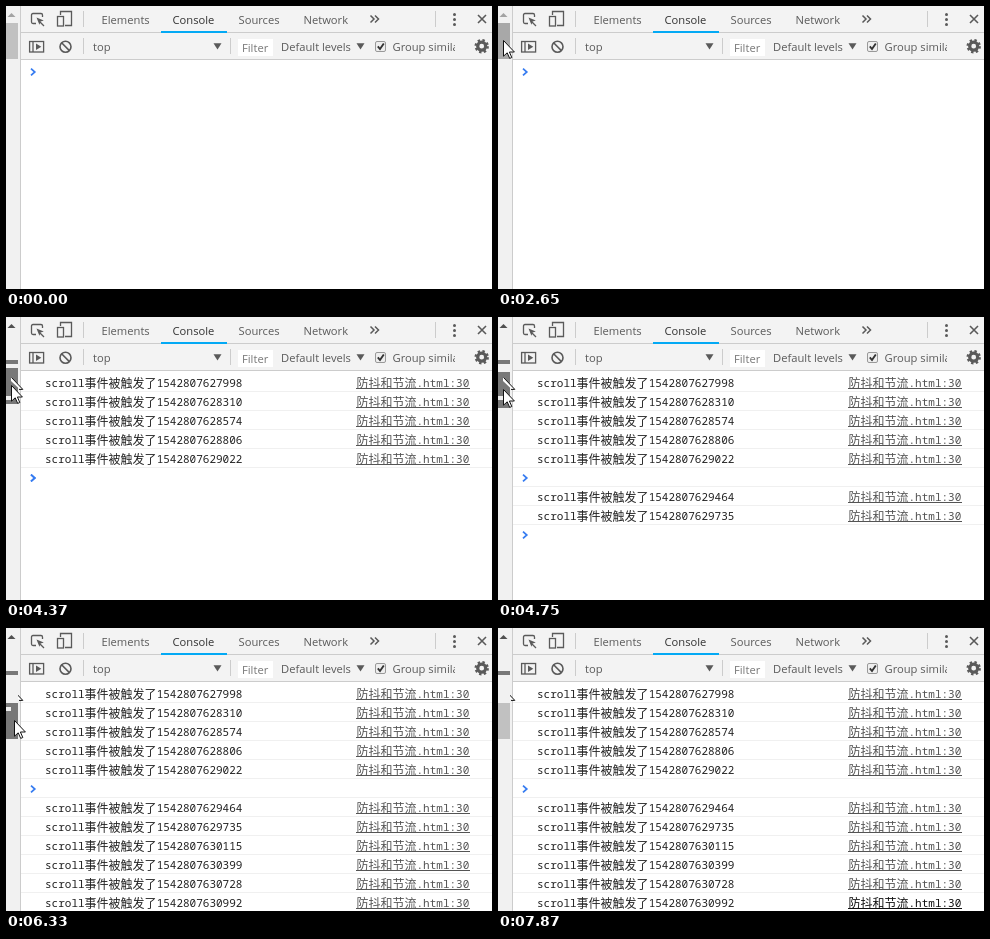
Write an HTML page that moves like this. It is 486x283 px and loops after 7.95 s.

```html
<!DOCTYPE html>
<html lang="zh">
<head>
<meta charset="utf-8">
<title>Scroll event log</title>
<style>
  html, body { margin: 0; width: 100%; height: 100%; overflow: hidden; background: #fff; }
  svg { display: block; width: 486px; height: 283px; }
  .ui { font: 11.2px "Open Sans", "Noto Sans", sans-serif; fill: #5a5a5a; }
  .mono { font: 11px "Noto Sans Mono", "DejaVu Sans Mono", monospace; fill: #222; white-space: pre; }
  .cjk { font: 12px "Noto Sans CJK SC", "Noto Sans CJK", sans-serif; baseline-shift: -1px; }
  .link { fill: #545454; }
  .link.hot { fill: #111; }
  .link .mono { fill: inherit; }
  .icon { fill: none; stroke: #5a5a5a; stroke-width: 1.3; }
  .solid { fill: #5a5a5a; }
  .line { fill: #ccc; }
  .prompt { fill: none; stroke: #367cf1; stroke-width: 1.7; }
</style>
</head>
<body>
<svg viewBox="0 0 486 283">
  <defs>
    <path id="arrow" d="M.5 .5V16.2L4.2 12.8L6.7 18.4L8.8 17.5L6.4 12H11.4Z" fill="#fff" stroke="#111" stroke-linejoin="round"/>
    <clipPath id="labelClip"><rect x="380" y="28" width="69" height="24"/></clipPath>
    <clipPath id="trailClip"><rect id="trailBox" y="60" width="18" height="13"/></clipPath>
  </defs>
  <rect width="486" height="283" fill="#fff"/>

  <rect x="15" width="471" height="53" fill="#f3f3f3"/>
  <rect class="line" x="15" y="26" width="471" height="1"/>
  <rect class="line" x="15" y="53" width="471" height="1"/>
  <rect x="155" y="25" width="66" height="2" fill="#03a9f4"/>

  <g class="line">
    <rect x="77" y="5" width="1" height="16"/>
    <rect x="429" y="5" width="1" height="16"/>
    <rect x="77" y="32" width="1" height="16"/>
    <rect x="224" y="32" width="1" height="16"/>
  </g>

  <g class="icon">
    <path d="M30 17.5H27Q25.5 17.5 25.5 16V9Q25.5 7.5 27 7.5H35Q36.5 7.5 36.5 9V11"/>
    <path d="M34 16L38 20"/>
    <path d="M54.5 9V5.5H65.5V19.5H59"/>
    <rect x="51.5" y="10.5" width="6" height="9.5"/>
    <path d="M364.5 9.5L368 13L364.5 16.5M369 9.5L372.5 13L369 16.5" stroke-width="1.5"/>
    <path d="M472 9L480 17M480 9L472 17" stroke-width="1.6"/>
    <rect x="23.6" y="35.5" width="14" height="10.5"/>
    <path d="M27 35.5V46"/>
    <circle cx="59.5" cy="40.7" r="5.5" stroke-width="1.6"/>
    <path d="M55.6 36.8L63.4 44.6" stroke-width="1.6"/>
    <circle cx="475.7" cy="40.2" r="4" stroke-width="3.2"/>
    <circle cx="475.7" cy="40.2" r="6" stroke-width="2.4" stroke-dasharray="2.356"/>
  </g>
  <g class="solid">
    <path d="M30.5 11.5L37.8 14.4L34.6 15.6L33.4 18.8Z"/>
    <circle cx="448.5" cy="8.5" r="1.5"/>
    <circle cx="448.5" cy="13.5" r="1.5"/>
    <circle cx="448.5" cy="18.5" r="1.5"/>
    <path d="M30 37.5L35.3 40.7L30 44Z"/>
    <path d="M207.5 37.3H215.5L211.5 43.5Z"/>
    <path d="M350.5 37.3H358.5L354.5 43.5Z"/>
  </g>

  <rect x="232" y="33" width="35" height="17" fill="#fff"/>
  <rect x="369.5" y="35.5" width="10" height="10" rx="1.5" fill="#eee" stroke="#999"/>
  <path d="M371.8 40.4L374 43L377.8 37.5" fill="none" stroke="#333" stroke-width="1.9"/>

  <g class="ui">
    <text x="95.5" y="18">Elements</text>
    <text x="166.5" y="18" fill="#333">Console</text>
    <text x="232.5" y="18">Sources</text>
    <text x="297.5" y="18">Network</text>
    <text x="87" y="45">top</text>
    <text x="236" y="46" fill="#777">Filter</text>
    <text x="275" y="45">Default levels</text>
    <text x="386.5" y="45" clip-path="url(#labelClip)">Group similar</text>
  </g>

  <g id="rows"></g>
  <path class="prompt" id="oldPrompt" d="M25 157.6L28.8 161L25 164.4"/>
  <path class="prompt" id="prompt" d="M25 62.6L28.8 66L25 69.4"/>

  <rect width="14" height="283" fill="#f1f1f1"/>
  <rect class="line" x="14" width="1" height="283"/>
  <path id="upArrow" d="M1.5 11L5.5 7L9.5 11Z"/>
  <rect id="residue" y="43" width="12" height="4" fill="#787878"/>
  <rect id="thumb" width="12" height="36"/>
  <rect id="notch" y="79" width="5" height="4" fill="#f1f1f1"/>
  <g id="trail" clip-path="url(#trailClip)">
    <path d="M5 60L16.5 72H13.5L5 64Z" fill="#fff"/>
    <path d="M5.5 60.5L16.8 72.4H13" fill="none" stroke="#111"/>
  </g>
  <use id="cursor" href="#arrow"/>
</svg>

<script>
const LOOP = 7950;
const ROW = 19;
const BASE = 1542807620000;

// [time logged after BASE, moment it shows up]
const LOGS = [
  [7998, 2970], [8310, 3280], [8574, 3600], [8806, 3830], [9022, 4060], [9464, 4440],
  [9735, 4750], [10115, 5080], [10399, 5360], [10728, 5690], [10992, 6000]
];

// [moment, top of the scroll thumb]
const THUMB = [
  [0, 17], [2970, 18], [3050, 19], [3280, 20], [3360, 22], [3440, 24], [3520, 26],
  [3600, 28], [3670, 31], [3750, 34], [3830, 37], [3910, 40], [3990, 43], [4060, 47],
  [4130, 49], [4370, 51], [4440, 52], [4530, 53], [4670, 54], [4750, 55], [5080, 56],
  [5130, 58], [5360, 60], [5530, 61], [5690, 62], [5840, 65], [5920, 69], [6000, 72],
  [6080, 74], [6330, 75]
];

const THUMB_COLOR = [
  [0, "#c1c1c1"], [2500, "#a8a8a8"], [2970, "#787878"], [6480, "#a8a8a8"], [6620, "#c1c1c1"]
];

const $ = id => document.getElementById(id);
const show = (el, on) => el.setAttribute("visibility", on ? "visible" : "hidden");
const stepAt = (table, t) => table.filter(s => s[0] <= t).pop()[1];
const rowOf = i => i < 5 ? i : i + 1;

const separator = row =>
  `<rect x="15" y="${74 + row * ROW}" width="471" height="1" fill="#f0f0f0"/>`;

function logRow([stamp], i) {
  const y = 70 + rowOf(i) * ROW;
  return `<g>${separator(rowOf(i))}
    <text class="mono" x="39" y="${y}">scroll<tspan class="cjk">事件被触发了</tspan>${BASE + stamp}</text>
    <g class="link">
      <text class="mono" x="350.5" y="${y}"><tspan class="cjk">防抖和节流</tspan>.html:30</text>
      <rect x="350" y="${y + 1}" width="114" height="1"/>
    </g></g>`;
}

$("rows").innerHTML = LOGS.map(logRow).join("") + `<g>${separator(5)}</g>`;
const rows = [...$("rows").children];
const gap = rows.pop();
const lastLink = rows[rows.length - 1].querySelector(".link");

function cursorAt(t, top) {
  if (t < 650) return null;
  if (t < 2030) return [224, 206];
  if (t < 2970) {
    const k = Math.min(8, Math.floor((t - 2030) / 77.5));
    const left = (1 - k / 8) ** 2;
    return [5 + Math.round(165 * left), 34 + Math.round(74 * left)];
  }
  if (t < 6620) return [t < 5840 ? 5 : 8, top + 17];
  if (t < 6700) return [70, 140];
  if (t < 6790) return [172, 218];
  if (t < 7630) return null;
  if (t < 7710) return [462, 264];
  return t < 7870 ? [452, 250] : null;
}

function render(t) {
  const top = stepAt(THUMB, t);
  const count = LOGS.filter(l => l[1] <= t).length;

  rows.forEach((row, i) => show(row, i < count));
  show(gap, count > 5);
  show($("oldPrompt"), count >= 5);
  $("prompt").setAttribute("transform", `translate(0 ${(count > 5 ? count + 1 : count) * ROW})`);
  lastLink.classList.toggle("hot", t >= 7710);

  $("upArrow").setAttribute("fill", t < 2970 ? "#a3a3a3" : "#505050");
  $("thumb").setAttribute("y", top);
  $("thumb").setAttribute("fill", stepAt(THUMB_COLOR, t));
  show($("residue"), t >= 4060);
  show($("notch"), t >= 4060 && t < 6480);
  show($("trail"), t >= 4060);
  $("trailBox").setAttribute("x", t < 5530 ? 0 : 12);

  const pos = cursorAt(t, top);
  show($("cursor"), pos);
  if (pos) $("cursor").setAttribute("transform", `translate(${pos})`);
}

const start = performance.now();
function tick() {
  render((performance.now() - start) % LOOP);
  requestAnimationFrame(tick);
}
tick();
</script>
</body>
</html>
```
